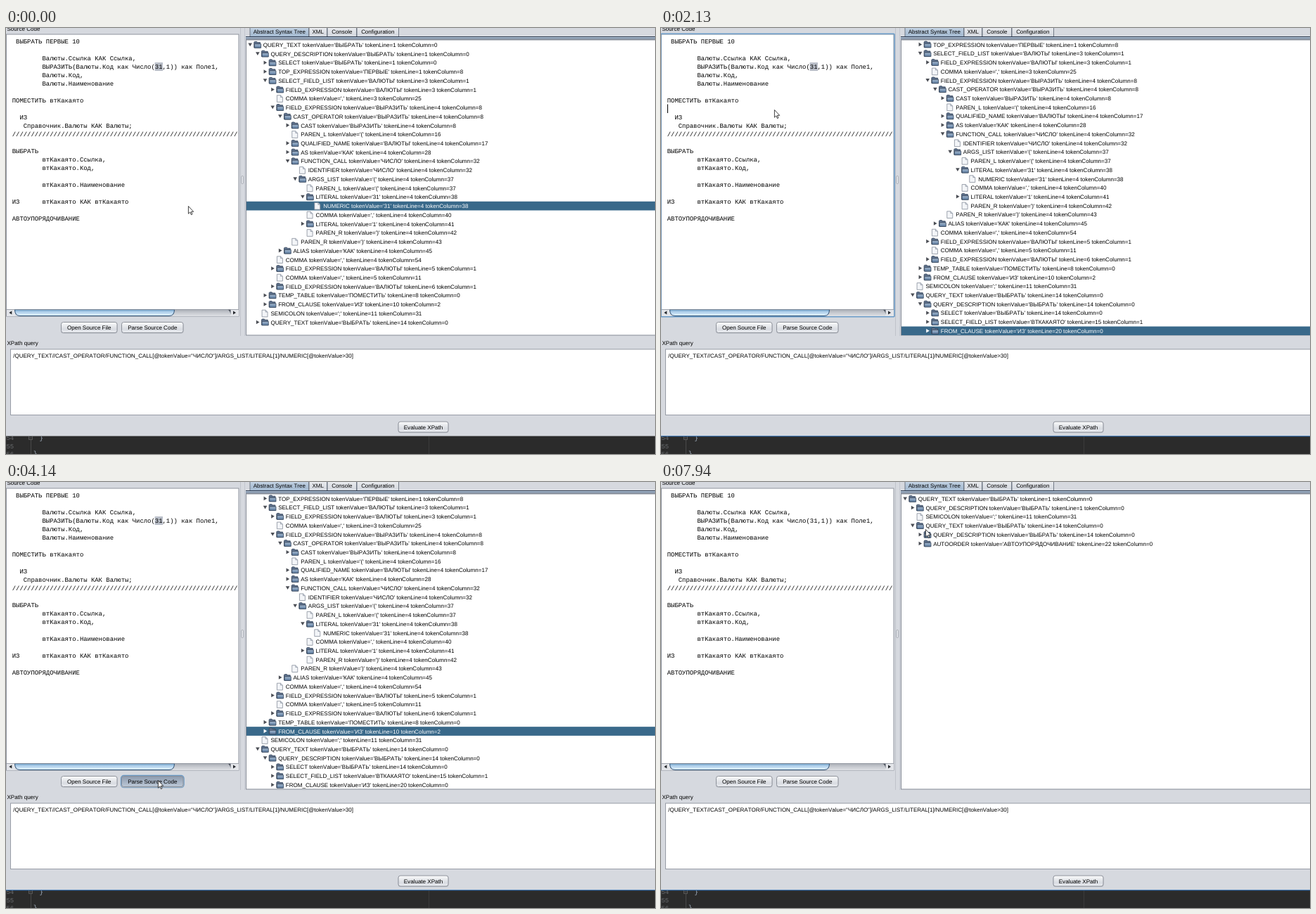
Recreate the animation shown at these times as an HTML page. Size 923x606 px, loop 8000 ms.

```html
<!DOCTYPE html>
<html lang="ru">
<head>
<meta charset="utf-8">
<style>
html, body { margin: 0; width: 100%; height: 100%; overflow: hidden; background: #d6d9df; }
svg { display: block; width: 923px; height: 606px; }
text { font: 8.06px "Liberation Sans", Arial, sans-serif; font-kerning: none; white-space: pre; text-rendering: geometricPrecision; }
.code { font: 8.92px "Liberation Mono", "Courier New", monospace; }
.mid { text-anchor: middle; }
</style>
</head>
<body>
<svg id="stage" viewBox="0 0 923 606"></svg>
<script>
const LOOP = 8000, ROW = 12.73, INDENT = 10.67;

// depth + state (o open, c closed, l leaf), name, value, line, column
const parse = s => s.trim().split("\n").map(r => {
  const [head, name, value, line, col] = r.trim().split(" ");
  return { depth: +head[0], kind: head[1], label: `${name} tokenValue='${value}' tokenLine=${line} tokenColumn=${col}` };
});

const firstQuery = parse(`
0o QUERY_TEXT ВЫБРАТЬ 1 0
1o QUERY_DESCRIPTION ВЫБРАТЬ 1 0
2c SELECT ВЫБРАТЬ 1 0
2c TOP_EXPRESSION ПЕРВЫЕ 1 8
2o SELECT_FIELD_LIST ВАЛЮТЫ 3 1
3c FIELD_EXPRESSION ВАЛЮТЫ 3 1
3l COMMA , 3 25
3o FIELD_EXPRESSION ВЫРАЗИТЬ 4 8
4o CAST_OPERATOR ВЫРАЗИТЬ 4 8
5c CAST ВЫРАЗИТЬ 4 8
5l PAREN_L ( 4 16
5c QUALIFIED_NAME ВАЛЮТЫ 4 17
5c AS КАК 4 28
5o FUNCTION_CALL ЧИСЛО 4 32
6l IDENTIFIER ЧИСЛО 4 32
6o ARGS_LIST ( 4 37
7l PAREN_L ( 4 37
7o LITERAL 31 4 38
8l NUMERIC 31 4 38
7l COMMA , 4 40
7c LITERAL 1 4 41
7l PAREN_R ) 4 42
5l PAREN_R ) 4 43
4c ALIAS КАК 4 45
3l COMMA , 4 54
3c FIELD_EXPRESSION ВАЛЮТЫ 5 1
3l COMMA , 5 11
3c FIELD_EXPRESSION ВАЛЮТЫ 6 1
2c TEMP_TABLE ПОМЕСТИТЬ 8 0
2c FROM_CLAUSE ИЗ 10 2
1l SEMICOLON ; 11 31`);
const closedQuery = parse("1c QUERY_TEXT ВЫБРАТЬ 14 0");
const openQuery = parse("1o QUERY_TEXT ВЫБРАТЬ 14 0");
const deepQuery = parse(`
2o QUERY_DESCRIPTION ВЫБРАТЬ 14 0
3c SELECT ВЫБРАТЬ 14 0
3c SELECT_FIELD_LIST ВТКАКАЯТО 15 1
3c FROM_CLAUSE ИЗ 20 0`);
const freshTop = parse(`
0o QUERY_TEXT ВЫБРАТЬ 1 0
1c QUERY_DESCRIPTION ВЫБРАТЬ 1 0
1l SEMICOLON ; 11 31`);
const freshDeep = parse(`
2c QUERY_DESCRIPTION ВЫБРАТЬ 14 0
2c AUTOORDER АВТОУПОРЯДОЧИВАНИЕ 22 0`);

const allRows = [...firstQuery, ...openQuery, ...deepQuery];
const views = [
  { from: 0, rows: [...firstQuery, ...closedQuery], selected: 18, scroll: 0 },
  { from: 540, rows: allRows, selected: 35, scroll: 38.6 },
  { from: 2280, rows: allRows, selected: 29, scroll: 38.6 },
  { from: 4290, rows: [...freshTop, ...closedQuery], selected: -1, scroll: 0 },
  { from: 7390, rows: [...freshTop, ...openQuery, ...freshDeep], selected: -1, scroll: 0 }
];

const pointer = [
  [0, 259, 253], [150, 190, 219], [1370, 192, 220], [1490, 193, 221],
  [1760, 181, 180], [1880, 161, 116], [2980, 172, 160], [3100, 190, 240],
  [3220, 209, 329], [3370, 215, 390], [3490, 217, 419], [3610, 217, 422],
  [3760, 216, 424], [6260, 232, 412], [6410, 330, 240], [6540, 386, 100],
  [6690, 389, 73], [6960, 372, 68], [7080, 356, 63], [7820, 366, 65], [7940, 376, 67]
];
const carets = [
  [420, 840, 169, 217], [1370, 1760, 169, 217], [2130, 2560, 9, 108.5],
  [2980, 3610, 9, 108.5], [4010, 4140, 9, 108.5]
];

const code = [
  " ВЫБРАТЬ ПЕРВЫЕ 10", "",
  "        Валюты.Ссылка КАК Ссылка,",
  "        ВЫРАЗИТЬ(Валюты.Код как Число(31,1)) как Поле1,",
  "        Валюты.Код,",
  "        Валюты.Наименование", "",
  "ПОМЕСТИТЬ втКакаято", "",
  "  ИЗ",
  "   Справочник.Валюты КАК Валюты;",
  "/".repeat(60), "",
  "ВЫБРАТЬ",
  "        втКакаято.Ссылка,",
  "        втКакаято.Код,", "",
  "        втКакаято.Наименование", "",
  "ИЗ      втКакаято КАК втКакаято", "",
  "АВТОУПОРЯДОЧИВАНИЕ"
];

const rect = (x, y, w, h, fill, more = "") =>
  `<rect x="${x}" y="${y}" width="${w}" height="${h}" fill="${fill}" ${more}/>`;
const text = (x, y, s, more = "") => `<text x="${x}" y="${y}" ${more}>${s}</text>`;
const path = (d, fill, more = "") => `<path d="${d}" fill="${fill}" ${more}/>`;
const gradient = (id, ...stops) => `<linearGradient id="${id}" x2="0" y2="1">` +
  stops.map((c, i) => `<stop offset="${i / (stops.length - 1)}" stop-color="${c}"/>`).join("") + "</linearGradient>";

const button = (x, y, w, label, id = "") =>
  rect(x, y + 1, w, 15.6, "#b9bdc5", 'rx="3.5"') +
  rect(x + .5, y + .5, w - 1, 15, "url(#btn)", `rx="3" stroke="#868b94" stroke-width=".9" ${id && `id="${id}"`}`) +
  text(x + w / 2, y + 11, label, 'class="mid"');

const tab = (x, w, label, on) =>
  path(`M${x} 13V-4H${x + w}V13Z`, on ? "url(#tabOn)" : "url(#tab)", 'stroke="#68707d" stroke-width=".9"') +
  text(x + w / 2, 8, label, 'class="mid" style="font-size:7.95px"');

function treeRow({ depth, kind, label }, i, { selected, scroll }) {
  const y = 24 + i * ROW - scroll, x = 365.8 + depth * INDENT, on = i === selected;
  const ax = x - 18.6;
  const arrow = kind === "l" ? "" : path(kind === "o"
    ? `M${ax - 2.8} ${y - 2.6}h5.6l-2.8 4.8z` : `M${ax - 2} ${y - 3}v5.6l4.6 -2.8z`, on ? "#fff" : "#4b4e55");
  return (on ? rect(342, y - 6.4, 581, ROW, "#39698a") : "") + arrow +
    `<use href="#${kind === "l" ? "page" : "folder"}" x="${x - 13.6}" y="${y - 5.3}"/>` +
    text(x, y + 3, label, on ? 'fill="#fff"' : "");
}

const stage = document.getElementById("stage");
stage.innerHTML = `<defs>
${gradient("btn", "#fbfbfc", "#e9ebee", "#d9dce2", "#eceef2")}
${gradient("btnDown", "#8d9bae", "#a5b2c3", "#bcc8d6")}
${gradient("tab", "#f2f3f5", "#dfe2e7", "#d3d7de")}
${gradient("tabOn", "#d3dfec", "#b3c6da", "#a2b8cf")}
${gradient("thumb", "#6c9cc4", "#a9cbe8", "#c9e2f6", "#e8f6ff")}
${gradient("track", "#a7abb3", "#c6c9cf", "#dfe1e5")}
${gradient("front", "#abbed2", "#7d98b7", "#587698")}
<g id="folder">${path("M.6 9.2V1.6L1.4.7H4.6L5.6 1.9H9.4V9.2Z", "#5d708b", 'stroke="#35445a" stroke-width=".8"')}
${path("M1.2 4H10.4V9.6H1.2Z", "url(#front)", 'stroke="#35445a" stroke-width=".8"')}</g>
<g id="page">${path("M1.2.6H6.3L9.2 3.4V10.3H1.2Z", "#f3f5f8", 'stroke="#878f9b" stroke-width=".8"')}
${path("M6.3.6V3.4H9.2", "#cbd2dc", 'stroke="#878f9b" stroke-width=".7"')}</g>
<clipPath id="codeClip">${rect(1, 9, 329.6, 391, "#fff")}</clipPath>
<clipPath id="treeClip">${rect(342, 17, 581, 420, "#fff")}</clipPath>
</defs>
${rect(0, 0, 923, 606, "#d6d9df")}
${text(1.5, 4, "Source Code")}
${rect(.5, 9, 330.5, 401, "#fff", 'stroke="#8f949e" stroke-width="1"')}
<rect id="hit" x="211.6" y="49" width="11.4" height="12" fill="#b9bec8"/>
<g clip-path="url(#codeClip)">${code.map((s, i) => text(8.7, 22 + i * 12, s, 'class="code"')).join("")}</g>
<rect id="caret" width="1" height="12.5" fill="#000"/>
${rect(1, 400, 330, 10, "url(#track)")}
${rect(1, 400, 12, 10, "#e3e5e9")}${rect(319, 400, 12, 10, "#e3e5e9")}
${path("M12.5 400.5H239.5Q239.5 409.5 232 409.5H20Q12.5 409.5 12.5 400.5Z", "url(#thumb)", 'stroke="#2d4f72" stroke-width="1"')}
${path("M315 400.5H319.5V408Q319 402 315 400.5Z", "#4c535e")}
${path("M4.3 405L8.3 402.4V407.6Z", "#24272c")}${path("M327 405L323 402.4V407.6Z", "#24272c")}
${rect(0, 400, 331, .8, "#8f949e")}
<rect id="ring" x="-.2" y="8.2" width="332.2" height="402.6" rx="1" fill="none" stroke="#6a9bc8" stroke-width="1.5"/>
${button(78, 418, 80.5, "Open Source File")}
<rect id="focus" x="163.6" y="417.6" width="89.4" height="17" rx="4" fill="none" stroke="#6a9bc8" stroke-width="1.5"/>
${button(164, 418, 88.5, "Parse Source Code", "parseBtn")}
${rect(333, 0, 1, 438, "#bfc3ca")}${rect(339, 0, 1, 438, "#c3c7cf")}
${rect(334.8, 210.5, 2.8, 11, "#e6e8ec", 'rx="1.2" stroke="#9ba0a9" stroke-width=".8"')}
${tab(347, 83.5, "Abstract Syntax Tree", true)}
${tab(431, 25.5, "XML")}${tab(457, 41.5, "Console")}${tab(499, 59.5, "Configuration")}
${rect(341, 12, 582, 1.2, "#26344a")}${rect(341, 13.2, 582, 2, "#a8bbd0")}${rect(341, 15.2, 582, 1, "#4e5b70")}
${rect(341.5, 17, 590, 420, "#fff", 'stroke="#858b96" stroke-width="1"')}
<g id="tree" clip-path="url(#treeClip)"></g>
${text(1.5, 451, "XPath query")}
${rect(6.5, 457, 930, 93.5, "#fff", 'stroke="#979ca6" stroke-width="1"')}
${text(10.3, 469.3, '/QUERY_TEXT//CAST_OPERATOR/FUNCTION_CALL[@tokenValue="ЧИСЛО"]/ARGS_LIST/LITERAL[1]/NUMERIC[@tokenValue&gt;30]', 'style="font-size:7.98px"')}
${button(557.5, 559.5, 72, "Evaluate XPath")}
${rect(0, 580.5, 923, 26, "#2b2b2b")}
${rect(601, 581, 1, 25, "#3b3b3b")}${rect(35, 586, 1, 20, "#4a4a4a")}
<svg x="0" y="581" width="923" height="25"><g fill="#6a6d70">
${text(.5, 4.5, "54", 'class="code"')}${text(.5, 16.5, "55", 'class="code"')}${text(.5, 28, "56", 'class="code"')}
<g fill="#a9b7c6">${text(47.5, 4.5, "}", 'class="code"')}${text(39, 27, "}", 'class="code"')}</g></g>
${path("M32.5 -1V4.5H37.5V-1M33.5 2H36.5", "none", 'stroke="#666" stroke-width=".8"')}</svg>
<rect id="edge" y="580" width="923" height="1.2" fill="#3f74ad"/>
<g id="pointer">${path("M.4 .5V11.2L2.8 8.9L4.4 12.6L6 11.9L4.4 8.3H7.7Z", "#fff", 'stroke="#111" stroke-width=".8" stroke-linejoin="round"')}</g>`;

const el = id => document.getElementById(id);
const show = (id, on) => el(id).setAttribute("visibility", on ? "visible" : "hidden");
const within = (t, a, b) => t >= a && t < b;
let shownView;

function draw(t) {
  const view = views.findLast(v => t >= v.from);
  if (view !== shownView) {
    el("tree").innerHTML = view.rows.map((r, i) => treeRow(r, i, view)).join("");
    shownView = view;
  }
  const [, x, y] = pointer.findLast(p => t >= p[0]);
  el("pointer").setAttribute("transform", `translate(${x} ${y})`);

  const caret = carets.find(c => within(t, c[0], c[1]));
  show("caret", caret);
  if (caret) {
    el("caret").setAttribute("x", caret[2]);
    el("caret").setAttribute("y", caret[3]);
  }
  show("hit", t < 4290);
  show("ring", within(t, 420, 4140));
  show("edge", t >= 420);
  show("focus", within(t, 4140, 7390));
  el("parseBtn").setAttribute("fill", within(t, 4010, 4290) ? "url(#btnDown)" : "url(#btn)");
}

const start = performance.now();
function tick() {
  draw((performance.now() - start) % LOOP);
  requestAnimationFrame(tick);
}
tick();
</script>
</body>
</html>
```
